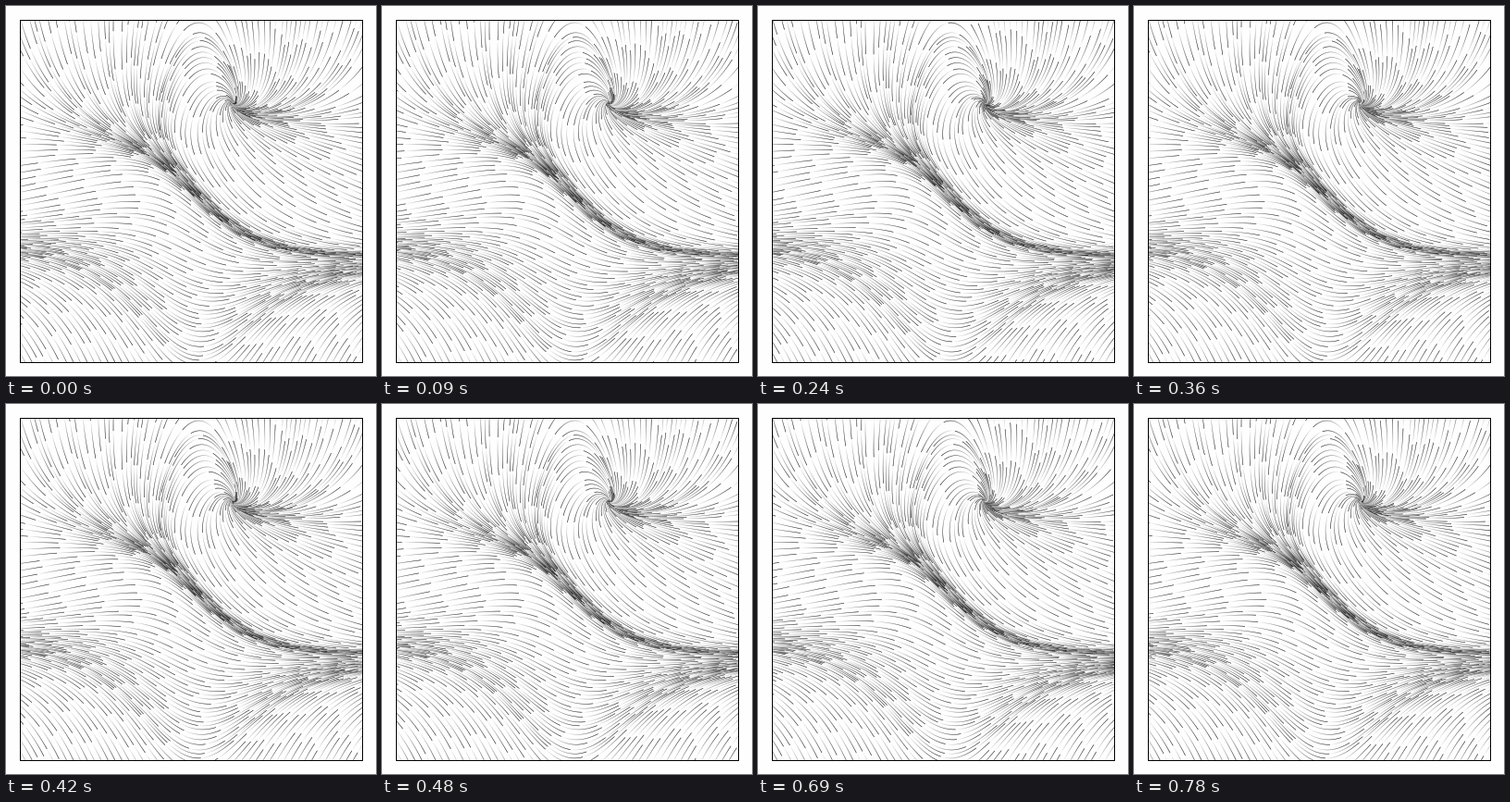
An HTML page with a canvas for the animation above (810 ms loop, 400 px wide and 400 px high).

```html
<!DOCTYPE html>
<html lang="en">
<head>
<meta charset="utf-8">
<title>Flow field</title>
<style>
  html, body { margin: 0; width: 100%; height: 100%; overflow: hidden; background: #fefefe; }
  canvas { display: block; width: 400px; height: 400px; }
</style>
</head>
<body>
<canvas id="stage" width="400" height="400"></canvas>
<script>
const SIZE = 400, LEFT = 15, RIGHT = 385, PAPER = 254;
const GRID = 100, RANGE = 3, CELL = 2 * RANGE / (GRID - 1);
const STEP = CELL / 8, MAX_STEPS = 1250, SPACING = 2;
const FRAME_MS = 30, FRAMES = 27, SHIFT = 0.075, FREQ = 1.5;
const SCALE = (RIGHT - LEFT) / (2 * RANGE);

let seed = 2011;
function random() {
  seed = (seed + 0x6D2B79F5) | 0;
  let t = Math.imul(seed ^ (seed >>> 15), 1 | seed);
  t = (t + Math.imul(t ^ (t >>> 7), 61 | t)) ^ t;
  return ((t ^ (t >>> 14)) >>> 0) / 4294967296;
}

// Velocity sampled on the grid
const U = new Float64Array(GRID * GRID), V = new Float64Array(GRID * GRID);
const used = new Uint8Array(GRID * GRID);
for (let j = 0; j < GRID; j++) {
  for (let i = 0; i < GRID; i++) {
    const k = j * GRID + i, x = i * CELL - RANGE, y = j * CELL - RANGE;
    U[k] = -1 - x * x + y;
    V[k] = 1 + x - x * y * y;
    if (i % (GRID - 1) === 0 || j % (GRID - 1) === 0) used[k] = 1;
  }
}

function lerp2(F, k, a, b) {
  return (F[k] * (1 - a) + F[k + 1] * a) * (1 - b) +
         (F[k + GRID] * (1 - a) + F[k + GRID + 1] * a) * b;
}

// Direction at a point; also marks the surrounding cells as covered
function heading(x, y) {
  const gx = (x + RANGE) / CELL, gy = (y + RANGE) / CELL;
  const i = Math.min(Math.floor(gx), GRID - 2), j = Math.min(Math.floor(gy), GRID - 2);
  const k = j * GRID + i;
  for (let b = 0; b < SPACING; b++)
    for (let a = 0; a < SPACING; a++) used[k + b * GRID + a] = 1;
  return Math.atan2(lerp2(V, k, gx - i, gy - j), lerp2(U, k, gx - i, gy - j));
}

function trace(x, y, sign) {
  const pts = [];
  while (Math.abs(x) < RANGE && Math.abs(y) < RANGE && pts.length <= MAX_STEPS) {
    const angle = heading(x, y);
    x += sign * STEP * Math.cos(angle);
    y += sign * STEP * Math.sin(angle);
    pts.push([x, y]);
  }
  return pts;
}

// One mark per short step: pixel position and phase along its streamline
const marks = [];
for (let k = 0; k < used.length; k++) {
  if (used[k]) continue;
  const x = (k % GRID) * CELL - RANGE, y = Math.floor(k / GRID) * CELL - RANGE;
  const ahead = trace(x, y, 1), behind = trace(x, y, -1).reverse();
  const line = [...behind, [x, y], ...ahead];
  const offset = random();
  used[k] = 1;
  for (let n = 1; n < line.length; n++) {
    const [ax, ay] = line[n - 1], [bx, by] = line[n];
    marks.push(LEFT + ((ax + bx) / 2 + RANGE) * SCALE,
               RIGHT - ((ay + by) / 2 + RANGE) * SCALE,
               (offset + n * STEP) * FREQ);
  }
}
const data = new Float32Array(marks);

const ctx = document.getElementById('stage').getContext('2d');
const image = ctx.createImageData(SIZE, SIZE);
const pixels = new Uint32Array(image.data.buffer);
const gray = new Float32Array(SIZE * SIZE);
const LINE_WIDTH = 0.694;
const SIDE = Math.sqrt(LINE_WIDTH * STEP * SCALE);

function blend(k, cover, tone) {
  gray[k] += (tone - gray[k]) * cover;
}

function draw(frame) {
  gray.fill(PAPER);
  for (let n = 0; n < data.length; n += 3) {
    const x = data[n] - SIDE / 2, y = data[n + 1] - SIDE / 2;
    const px = Math.floor(x), py = Math.floor(y);
    if (px < LEFT || py < LEFT || px >= RIGHT || py >= RIGHT) continue;
    const tone = (data[n + 2] + frame * SHIFT) % 1 * PAPER;
    const w = Math.min(SIDE, px + 1 - x), h = Math.min(SIDE, py + 1 - y);
    const k = py * SIZE + px;
    blend(k, w * h, tone);
    if (w < SIDE) blend(k + 1, (SIDE - w) * h, tone);
    if (h < SIDE) {
      blend(k + SIZE, w * (SIDE - h), tone);
      if (w < SIDE) blend(k + SIZE + 1, (SIDE - w) * (SIDE - h), tone);
    }
  }
  for (let k = 0; k < pixels.length; k++)
    pixels[k] = 0xff000000 | Math.round(gray[k]) * 0x010101;
  ctx.putImageData(image, 0, 0);
  ctx.strokeStyle = '#000';
  ctx.lineWidth = 1;
  ctx.strokeRect(LEFT + 0.5, LEFT + 0.5, RIGHT - LEFT, RIGHT - LEFT);
}

let shown = 0;
const start = performance.now();
function tick() {
  const frame = Math.floor((performance.now() - start) / FRAME_MS) % FRAMES;
  if (frame !== shown) draw(shown = frame);
  requestAnimationFrame(tick);
}
draw(0);
requestAnimationFrame(tick);
</script>
</body>
</html>
```
